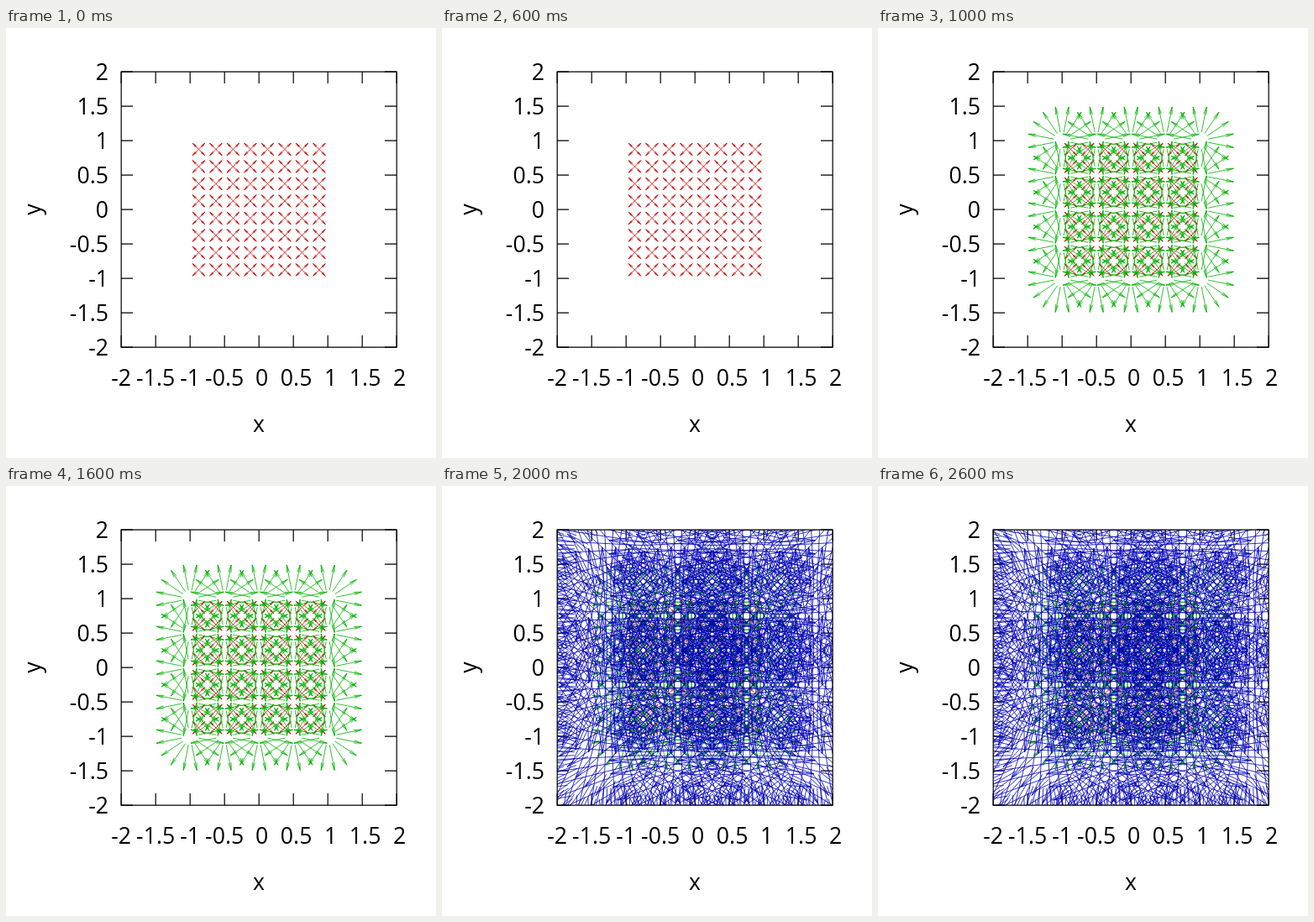
Animation of 512x512 px, one loop 3000 ms. Source, as an HTML page:

```html
<!DOCTYPE html>
<html lang="en">
<head>
<meta charset="utf-8">
<title>Nested direction fields</title>
<style>
  html, body { margin: 0; width: 100%; height: 100%; overflow: hidden; background: #fff; }
  svg { display: block; width: 512px; height: 512px; }
  path { fill: none; stroke: #000; stroke-width: 1.2; }
  text { font: 26.67px "Open Sans", "Noto Sans", sans-serif; white-space: pre; }
  .mid { text-anchor: middle; }
  .end { text-anchor: end; }
  .field { stroke-width: 0.8; }
  #fine { stroke: #c00000; }
  #medium { stroke: #00b000; animation: second 3s step-end infinite; }
  #coarse { stroke: #0000b4; animation: third 3s step-end infinite; }
  @keyframes second { 0% { visibility: hidden; } 33.3333% { visibility: visible; } }
  @keyframes third { 0% { visibility: hidden; } 66.6667% { visibility: visible; } }
</style>
</head>
<body>
<svg id="plot" viewBox="0 0 512 512">
  <clipPath id="area"><rect x="137" y="52" width="328" height="328"/></clipPath>
  <path id="ticks"/>
  <g clip-path="url(#area)">
    <path id="fine" class="field"/>
    <path id="medium" class="field"/>
    <path id="coarse" class="field"/>
  </g>
  <path d="M137.2 52.2H465.2V380.2H137.2Z"/>
  <text class="mid" x="301" y="480.5">x</text>
  <text class="mid" transform="translate(40.5 216) rotate(-90)">y</text>
</svg>
<script>
  const UNIT = 82, CX = 301.2, CY = 216.2, TICK = 14;
  const plot = document.getElementById("plot");
  const px = x => CX + UNIT * x;
  const py = y => CY - UNIT * y;
  const point = (x, y) => x.toFixed(2) + " " + y.toFixed(2);
  const setPath = (id, d) => document.getElementById(id).setAttribute("d", d);

  function label(cls, x, y, str) {
    const t = document.createElementNS("http://www.w3.org/2000/svg", "text");
    t.setAttribute("class", cls);
    t.setAttribute("x", x);
    t.setAttribute("y", y);
    t.textContent = str;
    plot.append(t);
  }

  function arrow(x, y, angle, from, to) {
    const c = Math.cos(angle), s = Math.sin(angle);
    const len = (to - from) * UNIT;
    const head = Math.max(0.4 * TICK, Math.min(0.3 * len, 2 * TICK));
    const tx = px(x + c * to), ty = py(y + s * to);
    const barb = turn => point(tx - head * Math.cos(angle + turn), ty + head * Math.sin(angle + turn));
    const spread = Math.PI / 18;
    return `M${point(px(x + c * from), py(y + s * from))}L${point(tx, ty)}` +
           `M${barb(spread)}L${point(tx, ty)}L${barb(-spread)}`;
  }

  // A square grid of probes, each with evenly spread rays
  function field(id, start, step, count, rays, from, to) {
    let d = "";
    for (let i = 0; i < count; i++)
      for (let j = 0; j < count; j++)
        for (let k = 0; k < rays; k++)
          d += arrow(start + i * step, start + j * step, (k + 0.5) * 2 * Math.PI / rays, from, to);
    setPath(id, d);
  }

  let ticks = "";
  for (let v = -2; v <= 2; v += 0.5) {
    const x = px(v), y = py(v);
    ticks += `M${x} 52v${TICK}M${x} 380v-${TICK}M137 ${y}h${TICK}M465 ${y}h-${TICK}`;
    label("mid", x, 426, v < 0 ? v : " " + v);
    label("end", 122, y + 9.3, v);
  }
  setPath("ticks", ticks);

  field("fine", -0.875, 0.25, 8, 4, 0, 0.125);
  field("medium", -1, 0.5, 5, 16, 0.125, 0.5);
  field("coarse", -1.25, 1, 4, 64, 0.5, 2);
</script>
</body>
</html>
```
